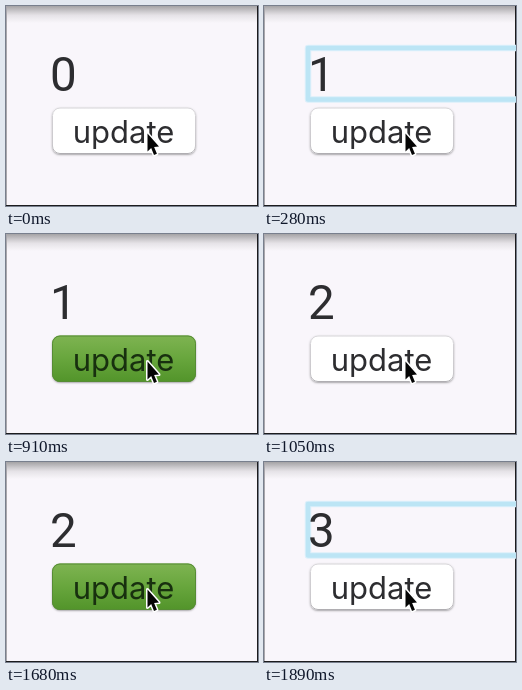
An HTML page with a canvas that plays this animation: 252x200 px, repeating every 1.96 s.

```html
<!DOCTYPE html>
<html lang="en">
<head>
<meta charset="utf-8">
<title>Counter</title>
<style>
  html, body { margin: 0; width: 100%; height: 100%; overflow: hidden; background: #f9f6fb; }
  canvas { display: block; width: 252px; height: 200px; }
</style>
</head>
<body>
<canvas id="stage" width="252" height="200"></canvas>
<script>
const ctx = document.getElementById('stage').getContext('2d');
const LOOP = 1960;
const INK = '#2d2d30';

// Each click: press, release with the new count, then the highlight.
const clicks = [
  { press: 70, release: 210, flash: 280, fade: 490, end: 490 },
  { press: 910, release: 1050, flash: 1120, fade: 1260, end: 1330 },
  { press: 1680, release: 1820, flash: 1890, fade: LOOP, end: LOOP }
];

function stateAt(t) {
  const state = { count: 0, pressed: false, flash: 0 };
  for (const c of clicks) {
    if (t >= c.release) state.count++;
    if (t >= c.press && t < c.release) state.pressed = true;
    if (t >= c.flash && t < c.end) state.flash = t < c.fade ? 1 : 0.5;
  }
  return state;
}

function verticalGradient(top, bottom, stops) {
  const g = ctx.createLinearGradient(0, top, 0, bottom);
  stops.forEach(([at, color]) => g.addColorStop(at, color));
  return g;
}

function roundRect(x, y, w, h, r) {
  ctx.beginPath();
  ctx.roundRect(x, y, w, h, r);
}

function text(string, x, y, font, color, align) {
  ctx.font = font;
  ctx.fillStyle = color;
  ctx.textAlign = align;
  ctx.fillText(string, x, y);
}

function drawWindow() {
  ctx.fillStyle = '#f9f6fb';
  ctx.fillRect(0, 0, 252, 200);
  ctx.fillStyle = verticalGradient(0, 17, [
    [0, 'rgba(80,80,80,.5)'], [0.2, 'rgba(90,90,90,.38)'],
    [0.55, 'rgba(110,110,110,.14)'], [1, 'rgba(120,120,120,0)']
  ]);
  ctx.fillRect(0, 0, 252, 17);
  ctx.fillStyle = '#a9a7ac';
  ctx.fillRect(0, 0, 1, 200);
  ctx.fillStyle = '#1c1c1e';
  ctx.fillRect(251, 0, 1, 200);
  ctx.fillRect(0, 199, 252, 1);
}

function drawButton(pressed) {
  ctx.save();
  ctx.shadowColor = 'rgba(0,0,0,.32)';
  ctx.shadowBlur = 2;
  ctx.shadowOffsetY = 1;
  roundRect(46, 101.5, 144, 46.5, 8);
  ctx.fillStyle = pressed
    ? verticalGradient(101, 148, [[0, '#7fb452'], [0.5, '#68a63d'], [1, '#52942a']])
    : '#ffffff';
  ctx.fill();
  ctx.restore();
  roundRect(46.5, 102, 143, 45.5, 7.5);
  ctx.lineWidth = 1;
  ctx.strokeStyle = pressed
    ? '#568c34'
    : verticalGradient(101, 148, [[0, '#d5d3d7'], [0.8, '#cac8cc'], [1, '#aeacb0']]);
  ctx.stroke();
  text('update', 117.5, 137, '31px Inter, sans-serif', pressed ? '#18300f' : INK, 'center');
}

function drawCursor() {
  const points = [[141.5, 127.5], [141.5, 145.5], [145.2, 142], [148, 149],
    [150.9, 147.8], [148.1, 141], [153, 140.6]];
  ctx.beginPath();
  points.forEach(([x, y]) => ctx.lineTo(x, y));
  ctx.closePath();
  ctx.lineJoin = 'round';
  ctx.lineWidth = 3;
  ctx.strokeStyle = '#ffffff';
  ctx.stroke();
  ctx.fillStyle = '#050505';
  ctx.fill();
}

function drawFlash(alpha) {
  ctx.save();
  for (const [width, color] of [[6.5, '#dceffa'], [4.5, '#bce5f5']]) {
    ctx.globalAlpha = alpha;
    ctx.lineWidth = width;
    ctx.strokeStyle = color;
    ctx.strokeRect(44, 42, 230, 51.5);
  }
  ctx.restore();
}

function draw(t) {
  const { count, pressed, flash } = stateAt(t);
  drawWindow();
  if (flash) drawFlash(flash);
  text(String(count), 43.9, 84.7, '47.5px Roboto, sans-serif', INK, 'left');
  drawButton(pressed);
  drawCursor();
}

const start = performance.now();
function tick() {
  draw((performance.now() - start) % LOOP);
  requestAnimationFrame(tick);
}
tick();
</script>
</body>
</html>
```
